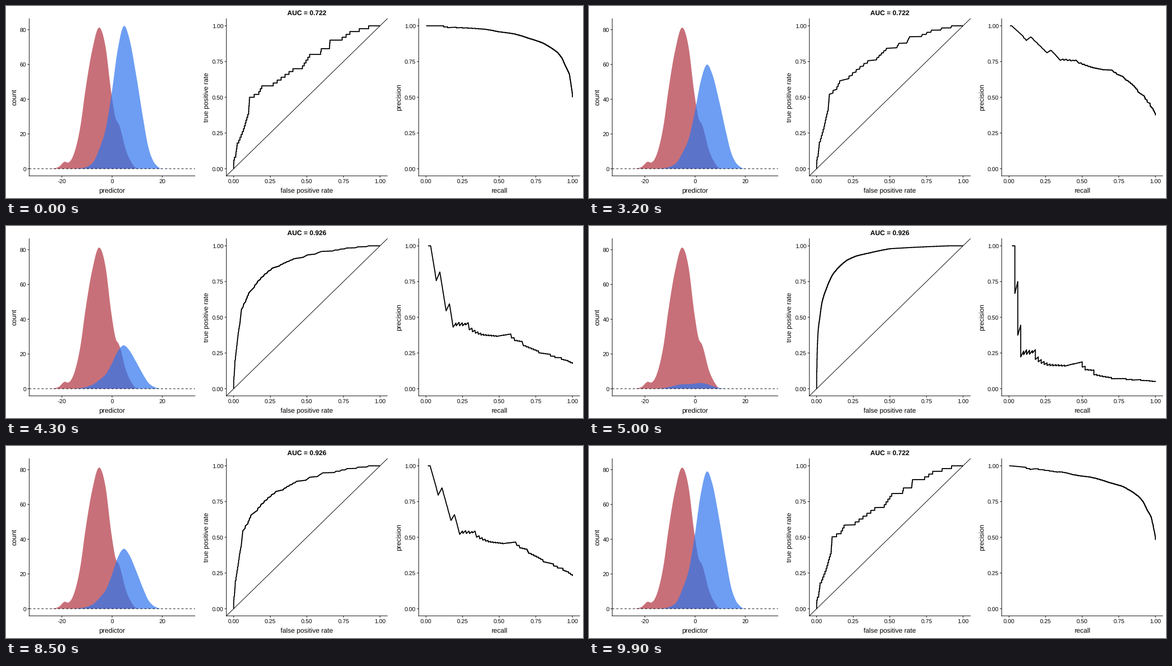
Animation of 1200 by 400 pixels, one loop 10 s. Source, as a matplotlib script:

```python
import matplotlib.pyplot as plt
import numpy as np
from matplotlib.animation import FuncAnimation

plt.rcParams.update({"font.family": ["Liberation Sans", "DejaVu Sans"],
                     "text.hinting": "no_hinting"})
W, H, DPI = 1200, 400, 100
PX = 72 / DPI                        # points per pixel
TOP, BASE, AXIS = 26.4, 339, 353.9   # panel top, zero line, x axis
DENS_X, ROC_X, PR_X = 48.3, 458.3, 858.3
rng = np.random.default_rng(4)

fig = plt.figure(figsize=(W / DPI, H / DPI), dpi=DPI, facecolor="white")
ax = fig.add_axes([0, 0, 1, 1])
ax.set(xlim=(0, W), ylim=(H, 0))
ax.axis("off")


# ---------- drawing helpers (stage pixels) ----------
def line(x, y, width=1.07, **kw):
    return ax.plot(x, y, color="black", lw=width * PX, snap=False, **kw)[0]


def label(x, y, text, size, **kw):
    style = dict(ha="center", va="baseline", rotation_mode="anchor")
    return ax.text(x, y, text, fontsize=size * PX, color="black", **(style | kw))


def panel(left, right, xticks, yticks, xname, yname, name_x):
    line([left, left], [TOP, AXIS])
    line([left, right], [AXIS, AXIS], solid_capstyle="projecting")
    for x, text in xticks:
        line([x, x], [AXIS, AXIS + 3.6], solid_capstyle="butt")
        label(x, 369.3, text, 12)
    for y, text in yticks:
        line([left - 3.6, left], [y, y], solid_capstyle="butt")
        label(left - 6.2, y + 4.4, text, 12, ha="right")
    label((left + right) / 2, 388.6, xname, 14)
    label(name_x, 190.2, yname, 14, rotation=90)


def unit_x(left, v):
    return left + 15.2 + 304.4 * np.asarray(v)


def unit_y(v):
    return BASE - 297.7 * np.asarray(v)


# ---------- curves ----------
def smooth(points, grid):
    """Cubic Hermite curve through (x, height) points, zero outside."""
    x, h = np.array(points, float).T
    m = np.gradient(h, x)
    k = np.clip(np.searchsorted(x, grid) - 1, 0, len(x) - 2)
    d = x[k + 1] - x[k]
    t = (grid - x[k]) / d
    y = ((1 + 2 * t) * (1 - t) ** 2 * h[k] + t * (1 - t) ** 2 * d * m[k]
         + t * t * (3 - 2 * t) * h[k + 1] + t * t * (t - 1) * d * m[k + 1])
    inside = (grid >= x[0]) & (grid <= x[-1])
    return np.where(inside, np.maximum(y, 0), 0)


def bell(x, mid, sd):
    return np.exp(-((x - mid) / sd) ** 2 / 2)


def rank(reds_above, reds=1000):
    """Cumulative true and false positives down the ranked scores."""
    hit = np.zeros(len(reds_above) + reds, int)
    hit[reds_above + np.arange(len(reds_above))] = 1
    return np.cumsum(hit), np.cumsum(1 - hit)


def roc(tp, fp):
    return np.append(0, fp / fp[-1]), np.append(0, tp / tp[-1])


def pr(tp, fp):
    return tp / tp[-1], tp / (tp + fp)


def densify(path, n):
    """Split the longest segments until the path has n points."""
    x, y = path
    seg = np.hypot(np.diff(x), np.diff(y))
    parts = np.ones(len(seg))
    for _ in range(n - len(x)):
        parts[np.argmax(seg / parts)] += 1
    at = np.append(0, np.cumsum(parts))
    return np.array([np.interp(np.arange(n), at, v) for v in (x, y)])


# ---------- data ----------
grid = np.linspace(60, 380, 641)
red_hill = smooth([(95, 0), (110, 4), (122, 14.5), (130, 13), (137, 21),
                   (145, 43), (155.5, 93), (164.5, 159), (179.5, 248),
                   (193.5, 294), (207, 254), (219, 158), (228, 105), (235, 92),
                   (250, 37), (265, 7), (300, 0)], grid)
many_hill = smooth([(145, 0), (170, 5), (182, 14.5), (195, 44), (208, 86),
                    (220, 159), (232, 246), (245.5, 297.5), (256, 273),
                    (271.3, 191.5), (285.3, 104), (295.3, 48), (305.3, 18),
                    (315, 5), (340, 0)], grid)
few_hill = 8.6 * bell(grid, 193, 20) + 10.8 * bell(grid, 236, 18)

# reds ranked above the k-th blue, from (k, reds) key points
few_keys = [(1, 0), (2, 0), (3, 1), (4, 5), (5, 14), (9, 24), (10, 35),
            (14, 67), (20, 102), (25, 108), (27, 172), (29, 192), (30, 270),
            (35, 405), (36, 470), (40, 519), (41, 594), (42, 598), (43, 655),
            (45, 658), (46, 741), (48, 794), (50, 922)]
few = np.interp(np.arange(1, 51), *np.transpose(few_keys)).round().astype(int)

# the larger sample grows near exponentially, with some jitter
many_keys = [(0, 0.4), (123, 1.01), (148, 2.01), (250, 4), (400, 10.3),
             (500, 22.5), (600, 36), (700, 67), (800, 110), (900, 208),
             (930, 273), (948, 350), (980, 500), (1000, 895)]
k, reds = np.transpose(many_keys)
b = np.arange(1, 1001)
wobble = np.where(b > 400, 0.012 * (1000 - b), 0) * rng.uniform(-1, 1, b.size)
many = np.sort(np.exp(np.interp(b + wobble, k, np.log(reds))).astype(int))

hill_ends = many_hill, few_hill
roc_ends = densify(roc(*rank(few)), 2001), np.array(roc(*rank(many)))
pr_ends = np.array(pr(*rank(many))), densify(pr(*rank(few)), 2000)


# ---------- scene ----------
def area(height, color):
    return ax.fill(grid, BASE - height, color=color, alpha=0.7, lw=0)[0]


quarters = [(v, f"{v:.2f}") for v in np.linspace(0, 1, 5)]
unit_ticks = [(unit_y(v), s) for v, s in quarters]

area(red_hill, "#b13340")
blue = area(many_hill, "#2f75ee")
line([DENS_X, 393], [BASE, BASE], dashes=(4, 4), dash_capstyle="butt")
panel(DENS_X, 393, [(220.6 + 5.217 * v, str(v)) for v in (-20, 0, 20)],
      [(BASE - 3.62 * v, str(v)) for v in range(0, 81, 20)],
      "predictor", "count", 20.8)
for left, names in ((ROC_X, ("false positive rate", "true positive rate")),
                    (PR_X, ("recall", "precision"))):
    panel(left, left + 334.8, [(unit_x(left, v), s) for v, s in quarters],
          unit_ticks, *names, left - 37.5)
line(unit_x(ROC_X, [-0.05, 1.05]), unit_y([-0.05, 1.05]))

curve = dict(width=2.13, solid_joinstyle="round", solid_capstyle="butt")
roc_line = line([], [], **curve)
pr_line = line([], [], **curve)
title = label(625.6, 19, "", 14, weight="bold")


def update(i):
    p = np.interp(i, [25, 50, 75, 100], [0, 1, 1, 0])

    def mix(ends):
        return (1 - p) * ends[0] + p * ends[1]

    blue.set_xy(np.column_stack([grid, BASE - mix(hill_ends)]))
    for path, ends, left in ((roc_line, roc_ends, ROC_X), (pr_line, pr_ends, PR_X)):
        x, y = mix(ends)
        path.set_data(unit_x(left, x), unit_y(y))
    title.set_text("AUC = 0.722" if p < 0.5 else "AUC = 0.926")
    return blue, roc_line, pr_line, title


anim = FuncAnimation(fig, update, frames=100, interval=100, repeat=True,
                     repeat_delay=0, blit=False)
plt.show()
```
